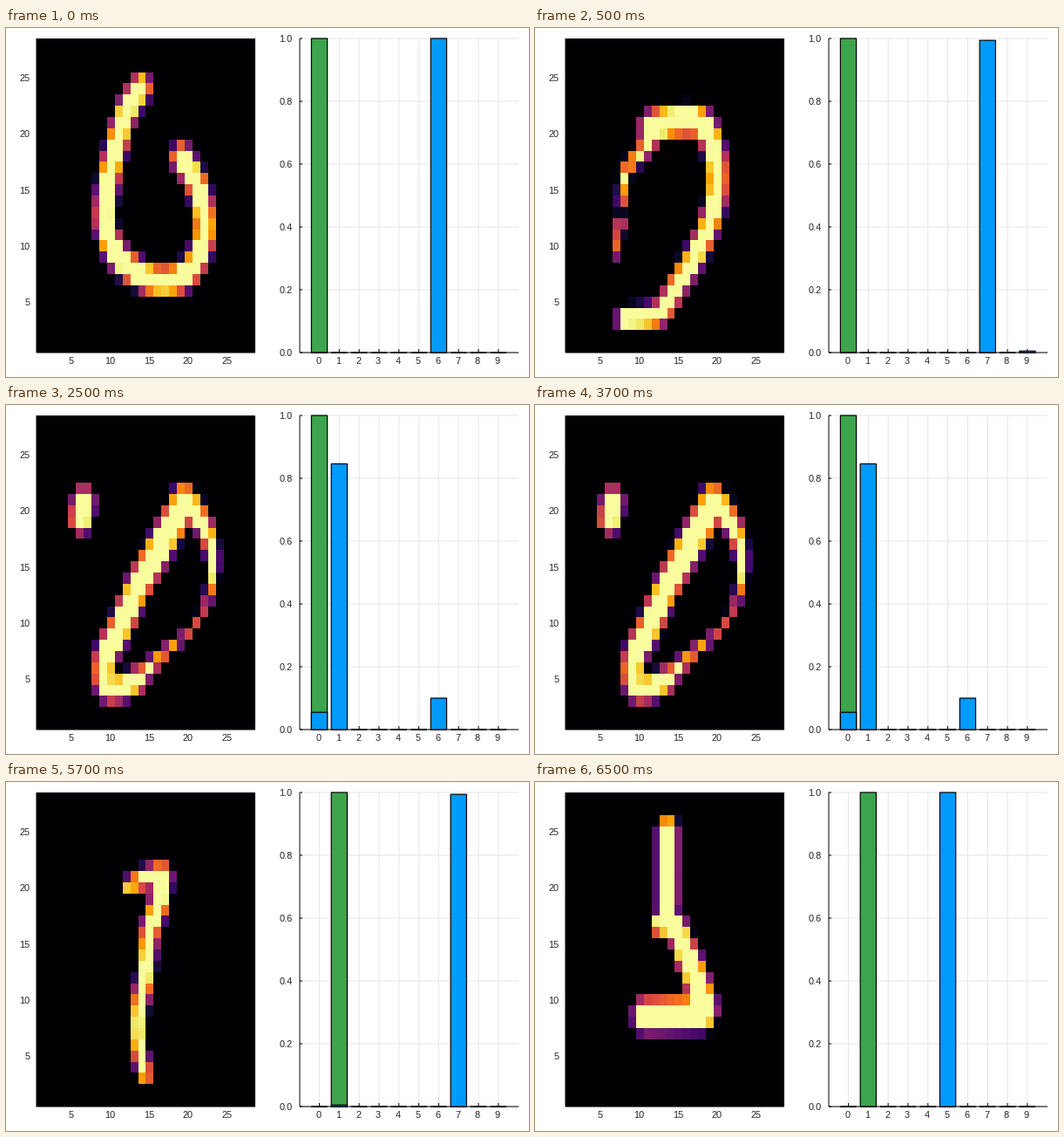
A matplotlib script for the animation above (8 s loop, 600x400 px).

```python
import matplotlib.pyplot as plt
import numpy as np
from matplotlib.animation import FuncAnimation
from matplotlib.patches import Rectangle

W, H, DPI = 600, 400, 100
PT = 72 / DPI
TOP, BOTTOM = 12, 372
IMG_LEFT, IMG_RIGHT = 35, 286
BAR_LEFT, BAR_RIGHT = 337, 588
SIZE = 28
GREEN, BLUE, GRID, INK = "#3da44d", "#009afa", "#e6e6e6", "#262626"

# Pen strokes: start radius, end radius, key points in cells (y upwards).
OPEN_LOOP = [
    (1.25, 1.25, [(13.9, 24.1), (12, 22), (10.7, 19), (9.5, 15), (9.4, 11.5),
                  (11.5, 8.6), (16, 6.9), (20, 7.7), (22, 11), (21.3, 15),
                  (19.1, 17.9)]),
]
BROKEN_LOOP = [
    (1.4, 1.0, [(11.4, 20.5), (14, 21.1), (18, 20.9), (19.7, 18),
                (19.7, 14), (17.8, 10), (14.8, 6.5), (12.4, 4), (8.1, 3.5)]),
    (.8, .4, [(11.2, 19.2), (9.8, 18.1), (8.2, 16.6), (7.7, 14)]),
    (.5, 0, [(7.5, 12.2), (6.8, 9)]),
]
SLANTED_LOOP = [
    (1.35, 1.35, [(6.5, 20.7), (6.2, 19.4)]),
    (1.6, 1.05, [(19.4, 20.7), (16.6, 17.1), (13.3, 13), (11.2, 9.6),
                 (9.3, 7), (9.4, 4.4), (11.5, 4.3), (13.8, 5.1)]),
    (1.2, 0, [(20.5, 20.3), (22.4, 18), (23.1, 15), (22.4, 12), (20.5, 9.4)]),
    (.1, .7, [(20.5, 9.4), (17.2, 7.5), (14.5, 5.7)]),
]
HOOKED_BAR = [
    (.6, 1.0, [(12.2, 20.1), (13.8, 20.7), (16.2, 21.2)]),
    (1.2, .85, [(16.6, 21), (16.2, 18.6), (15, 16), (14.4, 12), (13.6, 9),
                (13.6, 6), (14.4, 3.4)]),
]
FOOTED_BAR = [
    (1.3, 1.3, [(13.55, 25.1), (13.55, 18.5)]),
    (1.1, 1.6, [(12.6, 16.8), (14.6, 16.4), (15.9, 14.3), (17.2, 12),
                (18.3, 9.3)]),
    (1.5, 1.45, [(18.2, 8.8), (10.6, 8.6)]),
]

# (steps of 500 ms, strokes, true label, predicted probabilities)
SCENES = [
    (1, OPEN_LOOP, 0, {6: 1.0}),
    (4, BROKEN_LOOP, 0, {3: .001, 7: .994, 9: .005}),
    (4, SLANTED_LOOP, 0, {0: .055, 1: .846, 6: .1}),
    (4, HOOKED_BAR, 1, {1: .005, 7: .994}),
    (3, FOOTED_BAR, 1, {5: 1.0}),
]


def smooth_path(points, steps=30):
    """Catmull-Rom curve through the key points."""
    p = np.array([points[0], *points, points[-1]], float)
    t = np.linspace(0, 1, steps)[:, None]
    return np.vstack([
        b + t / 2 * (c - a + t * (2 * a - 5 * b + 4 * c - d
                                  + t * (3 * (b - c) + d - a)))
        for a, b, c, d in zip(p, p[1:], p[2:], p[3:])])


def rasterize(strokes):
    """Soft-edged intensity of the strokes on the cell grid."""
    gx, gy = np.meshgrid(np.arange(1, SIZE + 1), np.arange(1, SIZE + 1))
    grid = np.zeros((SIZE, SIZE))
    for start, end, points in strokes:
        path = smooth_path(points)
        for (x, y), r in zip(path, np.linspace(start, end, len(path))):
            grid = np.maximum(grid, r + .5 - np.hypot(gx - x, gy - y))
    return np.clip(grid, 0, .99)


def bar_x(n):
    return 359.5 + 22.82 * n


def prob_y(p):
    return BOTTOM - (BOTTOM - TOP) * p


def line(xs, ys, color="black", z=2):
    ax.plot(xs, ys, color=color, lw=PT, zorder=z, snap=False,
            solid_capstyle="butt")


def label(x, y, text, ha):
    ax.text(x, y, text, ha=ha, va="baseline", color=INK,
            family="Liberation Sans", size=11 * PT)


def bar(n, color, z):
    patch = Rectangle((bar_x(n) - 9.13, BOTTOM), 18.26, 0, facecolor=color,
                      edgecolor="black", lw=1.2 * PT, zorder=z, snap=False)
    return ax.add_patch(patch)


fig = plt.figure(figsize=(W / DPI, H / DPI), dpi=DPI, facecolor="white")
ax = fig.add_axes([0, 0, 1, 1])
ax.axis("off")

heat = ax.imshow(np.zeros((SIZE, SIZE)), cmap="inferno", vmin=0, vmax=1,
                 extent=(IMG_LEFT, IMG_RIGHT, BOTTOM, TOP), origin="lower",
                 interpolation="nearest", aspect="auto")
cell_w, cell_h = (IMG_RIGHT - IMG_LEFT) / SIZE, (BOTTOM - TOP) / SIZE
for n in range(5, SIZE, 5):
    label(IMG_LEFT + (n - .5) * cell_w - 1, 385, str(n), "center")
    label(27.5, BOTTOM - (n - .5) * cell_h + 4, str(n), "right")

for n in range(10):
    line([bar_x(n)] * 2, [TOP, BOTTOM], GRID, 1)
    line([bar_x(n)] * 2, [BOTTOM - 4, BOTTOM])
    label(bar_x(n) - 1, 385, str(n), "center")
for p in np.arange(6) / 5:
    line([BAR_LEFT, BAR_RIGHT], [prob_y(p)] * 2, GRID, 1)
    line([BAR_LEFT, BAR_LEFT + 3], [prob_y(p)] * 2)
    label(328.5, prob_y(p) + 4, f"{p:.1f}", "right")
for left, right in ((IMG_LEFT, IMG_RIGHT), (BAR_LEFT, BAR_RIGHT)):
    line([left, left], [TOP, BOTTOM])
    line([left, right], [BOTTOM, BOTTOM])

truth = [bar(n, GREEN, 3) for n in range(10)]
guess = [bar(n, BLUE, 4) for n in range(10)]
ax.set_xlim(0, W)
ax.set_ylim(H, 0)

images = [rasterize(scene[1]) for scene in SCENES]
timeline = [i for i, scene in enumerate(SCENES) for _ in range(scene[0])]


def update(step):
    index = timeline[step]
    _, _, answer, probs = SCENES[index]
    heat.set_data(images[index])
    for n in range(10):
        truth[n].set_height(prob_y(float(n == answer)) - BOTTOM)
        guess[n].set_height(prob_y(probs.get(n, 0)) - BOTTOM)
    return [heat, *truth, *guess]


anim = FuncAnimation(fig, update, frames=len(timeline), interval=500,
                     repeat=True, repeat_delay=0)
plt.show()
```
